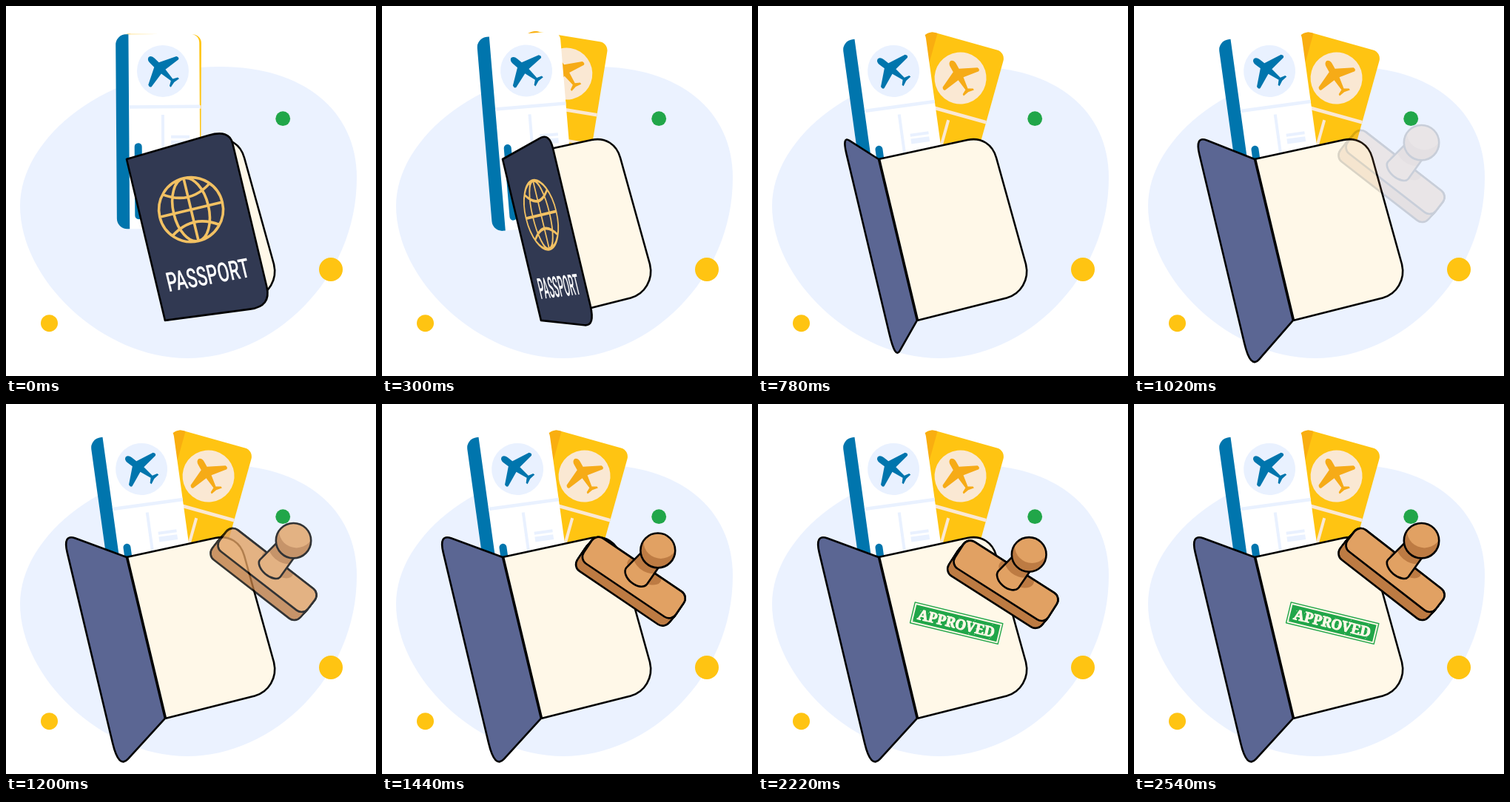
Write an HTML page with a canvas that moves like this. It is 500x500 px and loops after 3620 ms.

```html
<!DOCTYPE html>
<html lang="en">
<head>
<meta charset="utf-8">
<title>Passport approval</title>
<style>
html, body { margin: 0; width: 100%; height: 100%; overflow: hidden; background: #fff; }
canvas { display: block; width: 500px; height: 500px; }
</style>
</head>
<body>
<canvas id="stage"></canvas>
<script>
const LOOP = 3620;
const TILT = -13.4 * Math.PI / 180;
const LINE = 2.6;
const INK = '#000', WOOD = '#e1a163', WOOD_DARK = '#bd7b43';
const GREEN = '#21a649', YELLOW = '#ffc412', CREAM = '#fff8e8';

const canvas = document.getElementById('stage');
const ctx = canvas.getContext('2d');
const ratio = window.devicePixelRatio || 1;
canvas.width = canvas.height = 500 * ratio;

const mix = (a, b, p) => a + (b - a) * p;
const span = (t, from, to) => Math.min(1, Math.max(0, (t - from) / (to - from)));
const easeOut = (p, power) => 1 - Math.pow(1 - p, power);
const easeInOut = p => p * p * (3 - 2 * p);

function local(draw) {
  ctx.save();
  draw();
  ctx.restore();
}

function paint(path, fill, line) {
  if (fill) { ctx.fillStyle = fill; ctx.fill(path); }
  if (line) { ctx.strokeStyle = INK; ctx.lineWidth = line; ctx.stroke(path); }
}

function disc(x, y, r, fill) {
  const path = new Path2D();
  path.arc(x, y, r, 0, 7);
  paint(path, fill);
}

function box(x, y, w, h, radius, fill) {
  const path = new Path2D();
  path.roundRect(x, y, w, h, radius);
  paint(path, fill);
}

const blob = new Path2D('M19 270C19 178 135 82 290 82C400 82 474 140 474 232' +
  'C474 370 360 476 245 476C130 476 19 370 19 270Z');
const plane = new Path2D('M0-27Q4.5-26 4.5-20V-12L27-1Q29 3 26 4L4 1L1.8 17L8 20.5V23L0 21.5' +
  'L-8 23V20.5L-1.8 17L-4 1L-26 4Q-29 3-27-1L-4.5-12V-20Q-4.5-26 0-27Z');
const page = new Path2D('M164 206.8L283 181C302 177 317 187 322 205L362 349' +
  'C367 370 355 389 336 394.5L216 424.8Z');
const globe = new Path2D('M-43.5 0a43.5 43.5 0 1 0 87 0a43.5 43.5 0 1 0-87 0' +
  'M-24 0a24 43.5 0 1 0 48 0a24 43.5 0 1 0-48 0' +
  'M0-43.5V43.5M-43.5 0H43.5M-33-29Q0-6 33-29M-33 29Q0 6 33 29');

const blueTicket = {
  pivot: [198, 308], body: '#fff', stripe: '#0075ad', pale: '#e9f1ff', mark: '#0075ad'
};
const goldTicket = {
  pivot: [209, 312], body: YELLOW, stripe: '#f9ae10', pale: '#fae8d3', mark: '#f6ab17'
};

function ticket(look, degrees) {
  const [x, y] = look.pivot;
  local(() => {
    ctx.translate(x, y);
    ctx.rotate(degrees * Math.PI / 180);
    ctx.translate(-x, -y);
    box(150, 38, 113, 263, [14, 12, 12, 14], look.body);
    box(150, 38, 17.3, 263, [14, 0, 0, 14], look.stripe);
    disc(213.5, 88, 35, look.pale);
    box(167.3, 134, 95.7, 4.5, 0, look.pale);
    box(211, 147, 4, 110, 0, look.pale);
    box(224, 175, 25, 4, 0, look.pale);
    box(224, 182, 25, 7, 0, look.pale);
    box(174.5, 185, 10, 103, 5, look.stripe);
    ctx.translate(213.5, 88);
    ctx.rotate(-Math.PI / 4);
    paint(plane, look.mark);
  });
}

// The free edge swings over the hinge: u is its reach, top and foot its ends.
function coverPose(t) {
  const first = span(t, 0, 580);
  if (first < 1) return { u: mix(144.5, 0, first), top: mix(-7, -32, first), foot: mix(238.7, 258, first) };
  const p = easeOut(span(t, 580, 1140), 1.7);
  return { u: mix(0, -76.6, p), top: mix(-32, -51, p), foot: mix(258, 276, p) };
}

function cover(t) {
  const { u, top, foot } = coverPose(t);
  const front = u > 0, height = foot - top;
  const path = new Path2D();
  path.moveTo(0, 0);
  path.lineTo(u * .8, top * .8);
  path.quadraticCurveTo(u, top, u, top + height * .08);
  path.lineTo(u, foot - height * .11);
  path.quadraticCurveTo(u, foot, u * .8, mix(224, foot, .8));
  path.lineTo(0, 224);
  path.closePath();
  local(() => {
    ctx.translate(163, 207);
    ctx.rotate(TILT);
    paint(path, front ? '#313952' : '#5b6693', LINE);
    if (front) coverArt(u / 144.5, height / 245.7);
  });
}

function coverArt(squeeze, stretch) {
  ctx.translate(0, 100);
  ctx.scale(squeeze, stretch);
  ctx.translate(0, -100);
  local(() => {
    ctx.translate(69, 86.5);
    ctx.strokeStyle = '#f2c163';
    ctx.lineWidth = 3.6;
    ctx.stroke(globe);
  });
  ctx.translate(70.5, 190.5);
  ctx.transform(.625, .032, 0, 1, 0, 0);
  ctx.fillStyle = '#fff';
  ctx.font = '500 36.5px Roboto, "Liberation Sans", sans-serif';
  ctx.textAlign = 'center';
  ctx.fillText('PASSPORT', 0, 0);
}

function approval() {
  local(() => {
    ctx.translate(268.2, 296.2);
    ctx.rotate(13.6 * Math.PI / 180);
    ctx.strokeStyle = GREEN;
    ctx.lineWidth = 1.4;
    ctx.strokeRect(-61, -14.3, 122, 28.6);
    box(-58.3, -11.6, 116.6, 23.2, 0, GREEN);
    ctx.fillStyle = ctx.strokeStyle = CREAM;
    ctx.lineWidth = 1;
    ctx.font = '900 19px "Noto Serif", "Liberation Serif", serif';
    ctx.textAlign = 'center';
    ctx.fillText('APPROVED', 0, 7);
    ctx.strokeText('APPROVED', 0, 7);
    let seed = 7;
    const random = () => (seed = seed * 16807 % 2147483647) / 2147483647;
    for (let i = 0; i < 40; i++) {
      ctx.fillRect(random() * 116 - 58, random() * 23 - 11.5, .8, .8);
    }
  });
}

// Each pair is [lifted, pressed].
const stampPose = {
  x: [353, 271], y: [224.5, 289.5], angle: [37.8, 13.9],
  length: [151, 145], width: [37, 64], depthX: [-10, -2.5], depthY: [11, 6],
  baseX: [357, 273], baseY: [222, 290], baseR: [18, 17], baseDip: [10, 17],
  knobX: [388.5, 287], knobY: [184.7, 270], knobR: [23.7, 22],
  lightX: [4, 4], lightY: [-14, -4],
  shadeX: [367, 286], shadeY: [217, 273], shadeL: [25, 33], shadeW: [13, 22]
};

function stamp(press) {
  const s = {};
  for (const key in stampPose) s[key] = mix(...stampPose[key], press);
  const angle = s.angle * Math.PI / 180;
  const plate = new Path2D();
  plate.roundRect(-s.length / 2, -s.width / 2, s.length, s.width, 11);

  const atDepth = (depth, draw) => local(() => {
    ctx.translate(s.x + s.depthX * depth, s.y + s.depthY * depth);
    ctx.rotate(angle);
    draw();
  });

  // Stacked slices form the side: all outlines first, then all fills inside them.
  const inset = LINE / 2;
  const slices = Array.from({ length: 16 }, (_, i) => 1 - i / 15);
  for (const depth of slices) atDepth(depth, () => paint(plate, null, LINE));
  for (const depth of slices) atDepth(depth, () => box(inset - s.length / 2, inset - s.width / 2,
    s.length - LINE, s.width - LINE, 11 - inset, WOOD_DARK));

  atDepth(0, () => {
    paint(plate, WOOD);
    local(() => {
      ctx.clip(plate);
      ctx.rotate(-angle);
      const spot = new Path2D();
      spot.ellipse(s.shadeX - s.x, s.shadeY - s.y, s.shadeL, s.shadeW, angle, 0, 7);
      paint(spot, WOOD_DARK);
    });
    paint(plate, null, LINE);
  });

  const dx = s.knobX - s.baseX, dy = s.knobY - s.baseY, reach = Math.hypot(dx, dy);
  local(() => {
    ctx.translate(s.baseX, s.baseY);
    ctx.rotate(Math.atan2(dy, dx) + Math.PI / 2);
    const handle = new Path2D();
    handle.moveTo(14, -reach);
    handle.lineTo(s.baseR, 0);
    handle.ellipse(0, 0, s.baseR, s.baseDip, 0, 0, Math.PI);
    handle.lineTo(-14, -reach);
    handle.closePath();
    paint(handle, WOOD);
    local(() => {
      ctx.clip(handle);
      disc(-3, -reach + 5, s.knobR + 6, WOOD_DARK);
    });
    paint(handle, null, LINE);
  });

  const knob = new Path2D();
  knob.arc(s.knobX, s.knobY, s.knobR, 0, 7);
  paint(knob, WOOD_DARK);
  local(() => {
    ctx.clip(knob);
    disc(s.knobX + s.lightX, s.knobY + s.lightY, s.knobR, WOOD);
  });
  paint(knob, null, LINE);
}

// The stamp fades as one piece, so it is drawn on its own layer.
const layer = document.createElement('canvas');
layer.width = layer.height = canvas.width;

function fadedStamp(opacity) {
  const copy = layer.getContext('2d');
  ctx.clearRect(0, 0, 500, 500);
  stamp(0);
  copy.clearRect(0, 0, layer.width, layer.height);
  copy.drawImage(canvas, 0, 0);
  ctx.clearRect(0, 0, 500, 500);
  return () => local(() => {
    ctx.globalAlpha = opacity;
    ctx.drawImage(layer, 0, 0, 500, 500);
  });
}

function pressAt(t) {
  if (t < 1720) return span(t, 1260, 1720) ** 2;
  return 1 - easeOut(span(t, 1940, 2540), 2.4);
}

function draw(t) {
  ctx.setTransform(ratio, 0, 0, ratio, 0, 0);
  ctx.lineJoin = 'round';
  const opacity = span(t, 980, 1260);
  const showStamp = opacity > 0 && opacity < 1 ? fadedStamp(opacity) : () => stamp(pressAt(t));

  ctx.fillStyle = '#fff';
  ctx.fillRect(0, 0, 500, 500);
  paint(blob, '#ebf2ff');
  disc(439, 356, 16, YELLOW);
  disc(58.5, 428.7, 11.5, YELLOW);
  disc(374.2, 152.2, 9.9, GREEN);

  const fan = easeInOut(span(t, 0, 540));
  ticket(goldTicket, mix(.2, 15.6, fan));
  ticket(blueTicket, mix(-.4, -7.9, fan));
  paint(page, CREAM, LINE);
  cover(t);
  if (t >= 1720) approval();
  if (opacity > 0) showStamp();
}

const start = performance.now();
function tick() {
  draw((performance.now() - start) % LOOP);
  requestAnimationFrame(tick);
}
tick();
</script>
</body>
</html>
```
